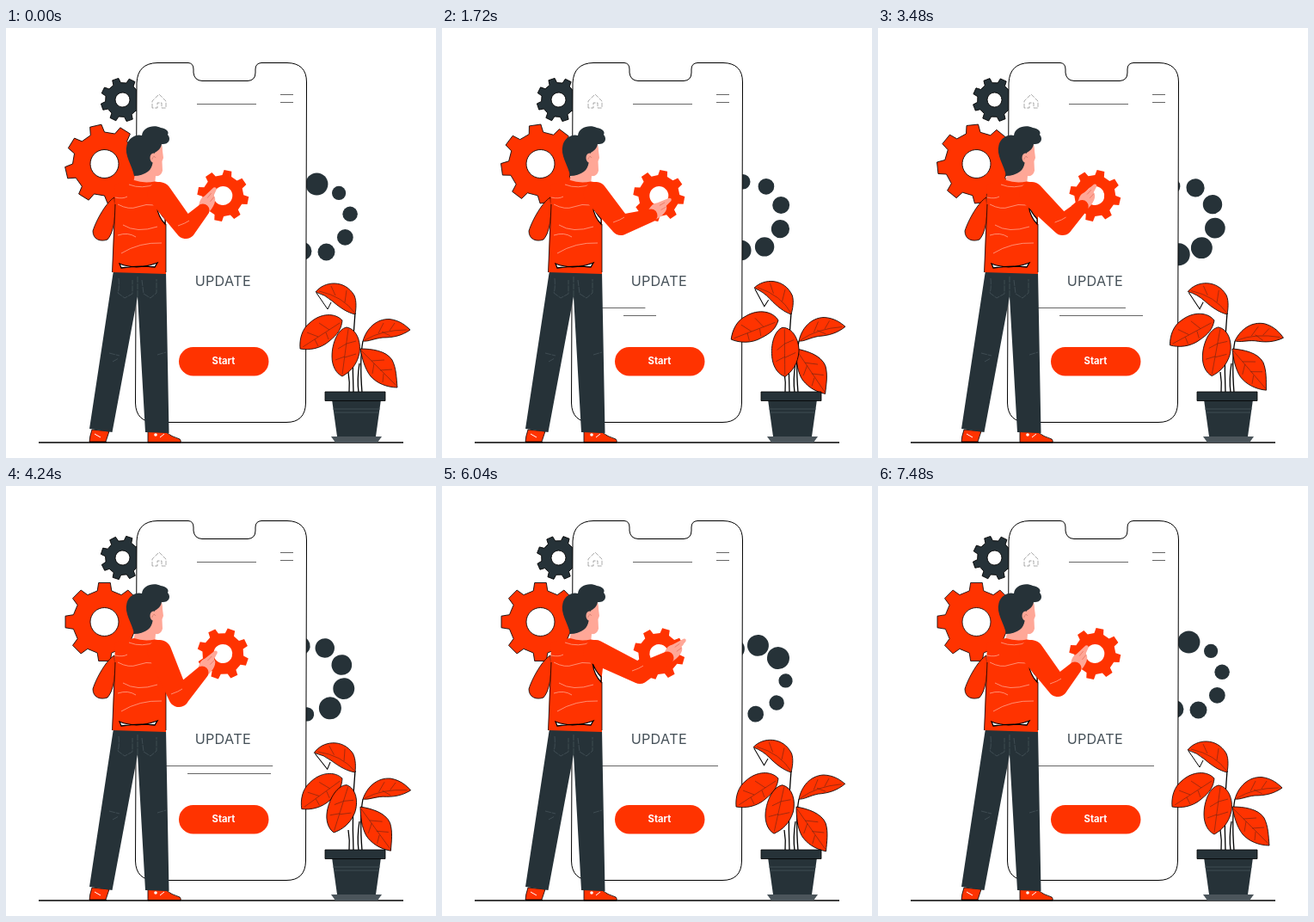
An HTML page that plays this animation: 500x500 px, repeating every 7.72 s.

```html
<!DOCTYPE html>
<html lang="en">
<head>
<meta charset="utf-8">
<title>Update</title>
<style>
  html, body { margin: 0; width: 100%; height: 100%; overflow: hidden; background: #fff; }
  svg { display: block; width: 100vw; height: 100vh; }
  .red { fill: #ff3300; }
  .dark { fill: #263238; }
  .skin { fill: #ffa797; }
  .edge { stroke: #000; stroke-width: .8; stroke-linejoin: round; }
  .line { fill: none; stroke: #000; stroke-width: 1; }
  .thin { fill: none; stroke: #555; stroke-width: .9; }
  .vein { fill: none; stroke: #6b2415; stroke-width: .6; }
  .fold { fill: none; stroke: #ffa58f; stroke-width: .8; }
  .seam { fill: none; stroke: #46535a; stroke-width: .8; }
  text { font-family: Inter, "Open Sans", sans-serif; text-anchor: middle; }
</style>
</head>
<body>
<svg viewBox="0 0 500 500">
  <rect width="500" height="500" fill="#fff"/>

  <g id="dots" class="dark"></g>
  <g id="smallGear"></g>
  <g id="bigGear"></g>

  <!-- phone -->
  <path class="line" style="fill:#fff" d="M176 40.500H212Q218 41 218 48V52Q219 61 228 61.500H281Q290 61 290 52V48Q290 41 297 40.500H327Q349.500 41 349.500 63L348.500 436Q348 458.500 326 458.500H174Q151 458.500 150.500 436L152 64Q153 41 176 40.500Z"/>
  <path class="thin" stroke-opacity=".55" d="M170 93V85L178 77L186 85V93H181V87H176V93Z" stroke-dasharray="5 1.500"/>
  <path class="thin" d="M222 88.500H291M319 77.500H334M319 86.500H334"/>
  <path id="bar1" class="thin"/>
  <path id="bar2" class="thin"/>
  <text x="252.300" y="300" font-size="16.200" letter-spacing=".3" fill="#455058">UPDATE</text>
  <rect class="red" x="201" y="371" width="104.500" height="33.500" rx="16.700"/>
  <text x="253" y="391" font-size="11.200" font-weight="700" fill="#fff">Start</text>
  <g id="handGear"></g>

  <path class="line" style="stroke-width:1.600" d="M38 482H462"/>

  <!-- plant -->
  <path class="line" style="stroke-width:1.300" d="M406 331Q402 375 404 424M398 400Q400 412 399 424M411 390Q408 408 410 424M415 364Q411 385 414 424"/>
  <g id="leaves"></g>
  <path d="M378 475H437L432 482H383Z" fill="#4b555b"/>
  <path class="dark" d="M379 432H436L430 475H385Z"/>
  <path class="dark edge" d="M371 423H441V433.500H371Z"/>
  <path class="seam" d="M380 443H435M381 447H434"/>

  <!-- figure -->
  <path class="red edge" d="M100 467L120 469L116 481H97Q97 476 100 467Z"/>
  <path class="red edge" d="M165 469L186 470Q192 475 202 478Q204 480 203 482H165Z"/>
  <path class="line" d="M97 481.500H117M165 481.500H203"/>
  <path d="M103 472L110 476M184 472L179 476" stroke="#fff" stroke-width="1"/>
  <circle cx="174" cy="473" r="1.800" fill="#fff"/>
  <path class="dark" d="M125 282H186L189.500 471L162 470L153 312L123.500 470L97 466Z"/>
  <path class="seam" d="M153 289V312M131 291Q132 303 130 308L138 314L147 309V293M158 293L160 309L168 314L175 308V292M120 378L132 381M124 388L131 384M176 380L186 377" stroke-dasharray="7 1"/>

  <path class="red edge" d="M126 197C117 202 105 223 101 236C101 246 110 249 118 246C124 239 126 228 127 212Z"/>
  <path class="skin" d="M152 158L179 131Q182 136 182 143L183 151L181.500 155L182 166Q180 173 174 172L173 183Q160 187 148 181Z"/>
  <path class="red" d="M127 182Q138 178 149 177Q160 181 173 178.500Q184 179 190 187L186 220V286L123.500 284Z"/>
  <path class="line" style="stroke-width:.8" d="M127 205L123.500 284M186 284V228"/>
  <path d="M175 206Q177 220 185 228L185 222Q179 216 175 206Z" fill="#fff" stroke="#000" stroke-width="1.200"/>
  <path d="M132 274Q152 282 176 273L173 278Q154 276 134 279Z" fill="#fff" stroke="#000" stroke-width="1.300"/>
  <path class="fold" d="M130 205Q143 212 153 208T173 206M136 229Q152 239 176 231M130 241Q142 237 151 243M134 262Q155 249 181 250M127 197Q136 199 141 196M143 182Q158 188 175 181"/>
  <path class="dark" d="M149 172C147 160 137 148 140.500 136C143 127 152 123 158 125C159 115 172 112 180 116C187 117 190 121 188 124C193 130 188 136 181 135C180 141 176 143 173 145C170 153 172 162 165 167Q158 172 149 172Z"/>
  <ellipse class="skin" cx="171.500" cy="151" rx="4" ry="5.500"/>
  <path class="vein" d="M169.500 153Q172 147 174 151" stroke-opacity=".4"/>

  <g id="hand">
    <path class="skin" d="M-3 -6C5 -7 9 -11 15 -7L29 -3Q32 -1 29 1L21 2C20 7 11 10 -3 6Z"/>
    <path d="M15 -3L22 -2M13 2L20 3" fill="none" stroke="#e8705f" stroke-width=".7"/>
  </g>
  <path id="sleeve" class="red"/>
  <path id="crease" class="fold"/>
</svg>

<script>
const LOOP = 7720, LAST = 7480, STEP = 40, SWING = LAST / 2;
const $ = id => document.getElementById(id);
const rad = deg => deg * Math.PI / 180;

const times = [0, 1720, 2760, 4240, 5000, 6040, LAST];
const spin = [0, 90.5, 141, 217, 257, 310, 360];
const bigSpin = [-13, -98, -149, -225, -268, -315, -360];

// one arm swing: elbow x, y, wrist x, y, hand angle
const swingAt = [0, .134, .337, .46, .615, .738, 1];
const arm = [
  [209, 233, 229, 212, -59],
  [201, 245, 228, 217, -54],
  [202, 240, 236, 217, -34],
  [208, 229, 243, 218, -38],
  [230, 218, 262, 200, -44],
  [230, 218, 260, 195, -47],
  [209, 233, 229, 212, -59]
];

const leaves = [
  { root: [406, 333], sway: [0, 6, 5, -4, -3, 4, 0],
    shape: 'M360 307C370 294 394 292 405 311C408 318 407 327 406 333C397 331 388 325 380 318Q371 310 360 307Z',
    veins: 'M364 306Q392 312 406 332M383 311L378 300M394 319L396 305' },
  { root: [416, 364], sway: [0, -4, 16, 3, 16, -5, 0],
    shape: 'M415 364C419 350 430 338 446 338.500C458 340 465 346 470 351C460 358 450 360 438 360C428 361 421 365 415 364Z',
    veins: 'M417 363Q437 351 466 351M433 355L439 343M446 352L452 343M437 353L447 358' },
  { root: [412, 373], sway: [0, 11, 0, 9, 2, 10, 0],
    shape: 'M412 373C425 373 442 375 449 386C454 396 454 407 455 418C443 418 431 413 424 405C417 396 414 384 412 373Z',
    veins: 'M413 375L454 416M425 387L440 386M435 398L449 397M428 390L426 402M439 402L438 412' },
  { root: [391, 340], sway: [0, 12, 12, -3, -2, 0, 0],
    shape: 'M391 340C383 331 366 331 353 343C344 350 341 362 342 373C352 375 366 373 376 364C386 356 390 350 391 340Z',
    veins: 'M388 343L345 371M376 351L364 343M363 359L350 354M372 354L375 362M359 362L363 370' },
  { root: [398, 348], sway: [0, -8, -4, 10, 9, 5, 0],
    shape: 'M396 348C386 350 379 366 379 382C379 393 384 402 391 405C400 400 408 392 411 378C413 365 408 350 396 348Z',
    veins: 'M398 350Q394 380 391 403M396 367L386 373M396 367L407 364M394 382L383 386M394 383L407 379' }
];

function tween(at, values, x) {
  let i = 1;
  while (i < at.length - 1 && x > at[i]) i++;
  const k = Math.min(1, (x - at[i - 1]) / (at[i] - at[i - 1]));
  const mix = (a, b) => a + (b - a) * k;
  const a = values[i - 1], b = values[i];
  return Array.isArray(a) ? a.map((v, j) => mix(v, b[j])) : mix(a, b);
}

function gear(id, outer, inner, hole, cls) {
  const pts = [];
  for (let i = 0; i < 8; i++) {
    for (const [off, r] of [[-13, inner], [-8.5, outer], [8.5, outer], [13, inner]]) {
      const a = rad(i * 45 + off);
      pts.push((r * Math.cos(a)).toFixed(2) + ',' + (r * Math.sin(a)).toFixed(2));
    }
  }
  $(id).innerHTML = `<polygon class="${cls}" points="${pts.join(' ')}"/>` +
    `<circle class="${cls}" r="${hole}" style="fill:#fff"/>`;
}

// tapered limb with round ends
function limb(ax, ay, ra, bx, by, rb) {
  const len = Math.hypot(bx - ax, by - ay) || 1;
  const nx = -(by - ay) / len, ny = (bx - ax) / len;
  return `M${ax + nx * ra} ${ay + ny * ra}A${ra} ${ra} 0 0 1 ${ax - nx * ra} ${ay - ny * ra}` +
    `L${bx - nx * rb} ${by - ny * rb}A${rb} ${rb} 0 0 1 ${bx + nx * rb} ${by + ny * rb}Z`;
}

const place = (id, x, y, deg) =>
  $(id).setAttribute('transform', `translate(${x} ${y}) rotate(${deg})`);

function build() {
  gear('smallGear', 25.5, 20, 8.5, 'dark edge');
  gear('bigGear', 46, 37, 16.5, 'red edge');
  gear('handGear', 30, 24, 11, 'red');
  let dots = '';
  for (let i = 0; i < 9; i++) {
    const a = rad(-88 + i * 40), r = i ? 7.5 + .62 * i : 13;
    dots += `<circle cx="${360 + 40.5 * Math.cos(a)}" cy="${222 + 40.5 * Math.sin(a)}" r="${r}"/>`;
  }
  $('dots').innerHTML = dots;
  $('leaves').innerHTML = leaves.map((leaf, i) =>
    `<g id="leaf${i}"><path class="red edge" d="${leaf.shape}"/><path class="vein" d="${leaf.veins}"/></g>`).join('');
  $('leaf0').innerHTML += '<path class="line" d="M361 308L374 327L378 319"/>';
}

function drawBar(id, x, y, width) {
  $(id).setAttribute('d', width > 0 ? `M${x} ${y}h${width}` : '');
}

function draw(t) {
  const turn = tween(times, spin, t);
  $('dots').setAttribute('transform', `rotate(${-turn} 356.3 222.5)`);
  place('smallGear', 135.5, 83.5, turn + 26);
  place('bigGear', 114.5, 158, tween(times, bigSpin, t));
  place('handGear', 252.3, 195, 11 - turn);

  leaves.forEach((leaf, i) =>
    $('leaf' + i).setAttribute('transform', `rotate(${tween(times, leaf.sway, t)} ${leaf.root})`));

  const [ex, ey, wx, wy, angle] = tween(swingAt, arm, t / SWING % 1);
  place('hand', wx, wy, angle);
  $('sleeve').setAttribute('d', limb(178.5, 193, 14, ex, ey, 12) + limb(ex, ey, 12, wx, wy, 7.5));
  $('crease').setAttribute('d', `M${ex - 9} ${ey - 3}Q${ex} ${ey - 6} ${ex + 4} ${ey - 9}`);

  const grown = Math.min(135, t * .0293);
  drawBar('bar1', 186, 325.5, t >= 4640 && t < 5400 ? 82 : grown);
  drawBar('bar2', 211, 334.5, t < 4640 ? Math.min(97, (t - 840) * .0432) : 0);
}

const start = performance.now();
function tick() {
  const t = (performance.now() - start) % LOOP;
  draw(Math.min(LAST, Math.floor(t / STEP) * STEP));
  requestAnimationFrame(tick);
}
build();
tick();
</script>
</body>
</html>
```
